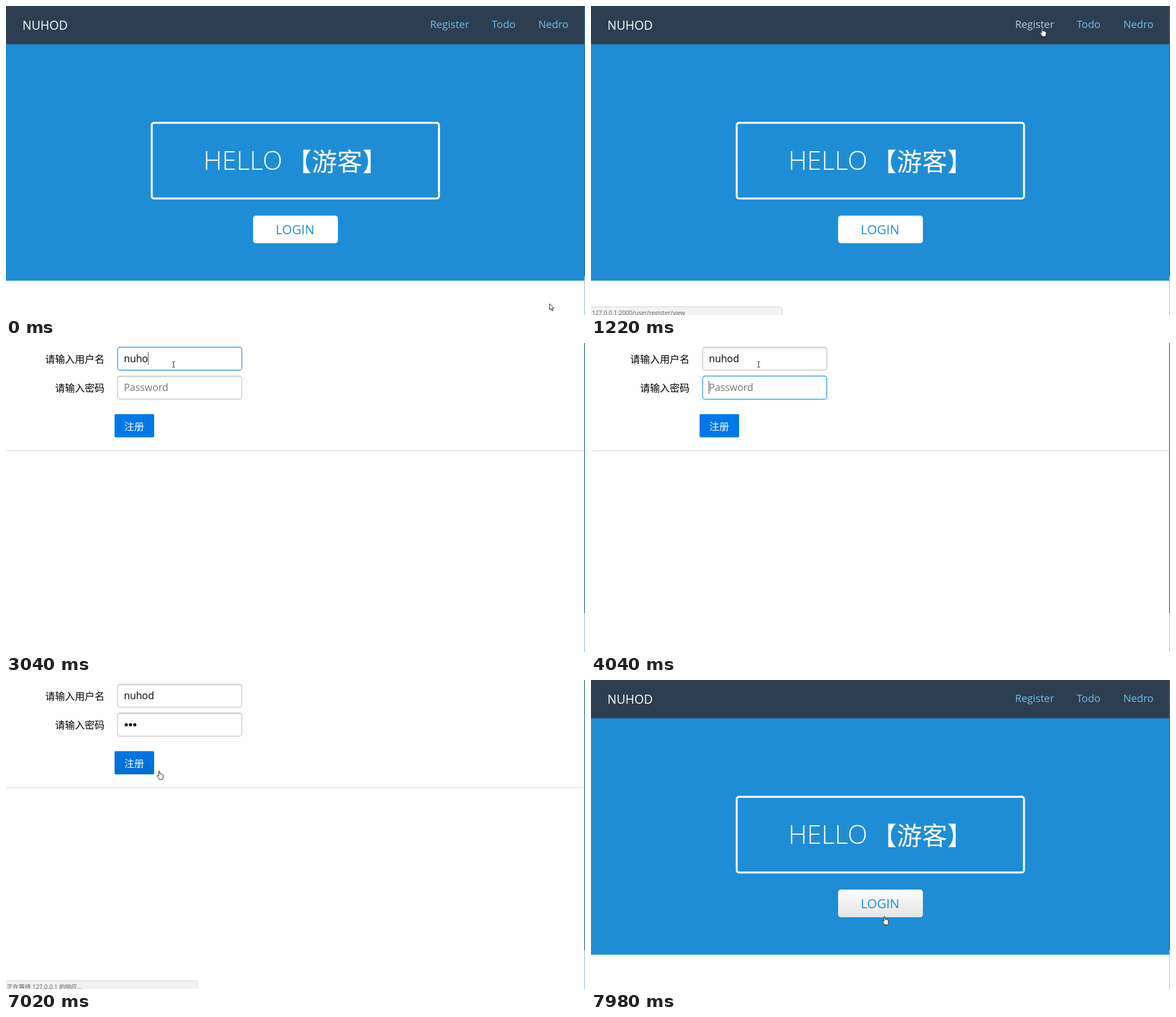
An HTML page with a canvas for the animation above (8000 ms loop, 1024 by 547 pixels).

```html
<!DOCTYPE html>
<html lang="zh">
<head>
<meta charset="utf-8">
<title>Register demo</title>
<style>
html, body { margin: 0; width: 100%; height: 100%; overflow: hidden; background: #fff; }
canvas { display: block; width: 100vw; height: 100vh; }
</style>
</head>
<body>
<canvas id="stage" width="1024" height="547"></canvas>
<script>
const ctx = document.getElementById('stage').getContext('2d');
const LOOP = 8000;
const FAMILY = '"Open Sans", "Noto Sans CJK SC", "Noto Sans CJK", sans-serif';
const USER = 'nuhod';

const LOGIN = { x: 437, y: 371, w: 150, h: 49 };
const SUBMIT = { x: 192, y: 126, w: 70, h: 41 };
const NAME_BOX = { x: 197, y: 7, w: 220.5, h: 41.5 };
const PASS_BOX = { x: 197, y: 58, w: 220.5, h: 42 };

const inside = (p, r) => p.x >= r.x && p.x <= r.x + r.w && p.y >= r.y && p.y <= r.y + r.h;
const lerp = (a, b, p) => a + (b - a) * p;
const between = (t, a, b) => t >= a && t < b;
const countPast = (t, times) => times.filter(at => t >= at).length;

// Progress in n even jumps, the first at t0 and the last at t1.
function jumps(t, t0, t1, n) {
  if (t < t0) return 0;
  return Math.min(n, Math.floor((t - t0) / (t1 - t0) * (n - 1) + 0.001) + 1) / n;
}

function move(from, to, p) {
  return { x: lerp(from[0], to[0], p), y: lerp(from[1], to[1], p) };
}

function text(str, x, y, size, color, weight = 400) {
  ctx.font = `${weight} ${size}px ${FAMILY}`;
  ctx.fillStyle = color;
  ctx.fillText(str, x, y);
}

function rect(x, y, w, h, color) {
  ctx.fillStyle = color;
  ctx.fillRect(x, y, w, h);
}

function rounded(x, y, w, h, r) {
  ctx.beginPath();
  ctx.roundRect(x, y, w, h, r);
}

function button(b, radius, color, hover, pressed) {
  rounded(b.x, b.y, b.w, b.h, radius);
  ctx.fillStyle = color;
  ctx.fill();
  if (hover) {
    const shade = ctx.createLinearGradient(0, b.y, 0, b.y + b.h);
    shade.addColorStop(0, 'rgba(0,0,0,0)');
    shade.addColorStop(0.4, 'rgba(0,0,0,.05)');
    shade.addColorStop(1, 'rgba(0,0,0,.1)');
    ctx.fillStyle = shade;
    ctx.fill();
  }
  if (pressed) {
    for (let i = 0; i < 4; i++) {
      rounded(b.x + i + 0.5, b.y + i + 0.5, b.w - 2 * i - 1, b.h - 2 * i - 1, radius);
      ctx.strokeStyle = `rgba(0,0,0,${0.24 - i * 0.06})`;
      ctx.lineWidth = 1;
      ctx.stroke();
    }
  }
}

function field(b, focused) {
  rounded(b.x, b.y, b.w, b.h, 4);
  ctx.fillStyle = '#fff';
  ctx.fill();
  if (!focused) {
    rect(b.x + 2, b.y + 1, b.w - 4, 1.5, '#e2e2e2');
    rect(b.x + 2, b.y + 2.5, b.w - 4, 1, '#f4f4f4');
  }
  rounded(b.x + 0.5, b.y + 0.5, b.w - 1, b.h - 1, 4);
  ctx.strokeStyle = focused ? '#2a9be0' : '#c6c6c6';
  ctx.lineWidth = 1.4;
  ctx.stroke();
}

const caret = (x, y) => rect(Math.floor(x), y, 1, 23, '#444');

const shapes = {
  arrow: new Path2D('M0 0V11L2.6 8.7L4.4 12.7L6 12L4.3 8.2H7.8Z'),
  hand: new Path2D('M-1 1.2Q0 -.2 1 1.2V5.6Q2.2 5 3.2 6.2Q4.4 5.6 5.4 6.8Q7 6.4 7 8V11.5' +
    'Q7 13.5 5.8 15.5H.2Q-.8 13.5 -3.6 9.8Q-4 8 -2.4 8.4L-1 9.6Z'),
  beam: new Path2D('M-2.5 -5H-.7L0 -4.4L.7 -5H2.5M0 -4.4V4.4M-2.5 5H-.7L0 4.4L.7 5H2.5')
};

function pointer(p) {
  ctx.save();
  ctx.translate(p.x, p.y);
  ctx.lineJoin = 'round';
  ctx.lineWidth = 1;
  ctx.strokeStyle = '#1c1c1c';
  if (p.kind !== 'beam') {
    ctx.fillStyle = '#fff';
    ctx.fill(shapes[p.kind]);
  }
  ctx.stroke(shapes[p.kind]);
  ctx.restore();
}

function pointerAt(t) {
  let p;
  if (t < 920) {
    const k = jumps(t, 70, 840, 11);
    p = move([961.5, 527], [827, 57.5], k * k * (3 - 2 * k));
  } else if (t < 1870) {
    p = move([827, 57.5], [798, 38.5], jumps(t, 920, 1220, 5));
    if (t >= 995) p.kind = 'hand';
  } else if (t < 6060) {
    p = move([296.5, 38], [231, 159], jumps(t, 5610, 5840, 4));
    if (inside(p, NAME_BOX) || inside(p, PASS_BOX)) p.kind = 'beam';
    if (inside(p, SUBMIT)) p.kind = 'hand';
  } else if (t < 6930) {
    p = move([231, 159], [228, 158], jumps(t, 6060, 6240, 3));
    p.kind = 'hand';
  } else if (t < 7200) {
    p = move([228, 158], [271, 160.5], jumps(t, 6930, 7020, 2));
    if (t < 7090) p.kind = 'hand';
  } else {
    p = move([542, 157.5], [519, 418], jumps(t, 7430, 7980, 8) ** 1.6);
    if (inside(p, LOGIN)) p.kind = 'hand';
  }
  p.kind = p.kind || 'arrow';
  return p;
}

function homePage(t, p) {
  rect(0, 67, 1024, 419.3, '#1f8dd6');
  rect(0, 0, 1024, 67.5, '#2d3e50');
  rect(0, 67.5, 1024, 1, 'rgba(0,0,0,.15)');
  text(USER.toUpperCase(), 29, 42.2, 21.5, '#fff');
  const onRegister = between(t, 995, 1770);
  text('Register', 750, 38.5, 18.3, onRegister ? '#aecfe5' : '#6fbef3');
  text('Todo', 859, 38.5, 18.3, '#6fbef3');
  text('Nedro', 941.5, 38.5, 18.3, '#6fbef3');

  rounded(257.7, 206.7, 508, 134, 4);
  ctx.strokeStyle = '#fff';
  ctx.lineWidth = 3.5;
  ctx.stroke();
  text('HELLO', 349, 290, 46, '#fff', 300);
  text('【游客】', 496, 291.5, 44.7, '#fff', 300);

  button(LOGIN, 5, '#fff', inside(p, LOGIN));
  text('LOGIN', 477, 404, 22.5, '#1f8dd6');
}

function formPage(t, p) {
  const onPass = between(t, 4040, 6380);
  const onName = between(t, 1870, 4040);
  const name = USER.slice(0, countPast(t, [1870, 1950, 2650, 3040, 3200]));
  const dots = countPast(t, [4830, 5080, 5230]);

  text('请输入用户名', 69.3, 34.6, 17.5, '#000');
  text('请输入密码', 86.8, 85.6, 17.5, '#000');
  field(NAME_BOX, onName);
  field(PASS_BOX, onPass);

  text(name || 'Username', 208.4, 34.2, 17.5, name ? '#000' : '#757575');
  if (onName && !between(t, 2480, 2650) && t < 3730) {
    caret(208.4 + ctx.measureText(name).width, 16);
  }

  if (!dots) text('Password', 208.4, 85.2, 17.5, '#757575');
  ctx.fillStyle = '#000';
  for (let i = 0; i < dots; i++) {
    ctx.beginPath();
    ctx.arc(212.7 + i * 7.5, 79.3, 2.8, 0, 7);
    ctx.fill();
  }
  if (onPass && !between(t, 4590, 4830) && !between(t, 5760, 6240)) {
    caret(208.4 + dots * 7.6, 67);
  }

  const hover = t >= 6930 || inside(p, SUBMIT);
  button(SUBMIT, 2, '#0078e7', hover, between(t, 6380, 6540));
  text('注册', 209.3, 153.8, 17.5, '#fff');
  rect(0, 189.8, 1022, 1.3, '#dedede');
}

function statusBar(str) {
  rounded(-4, 532.5, 342.5, 20, 3);
  ctx.fillStyle = '#f2f2f2';
  ctx.fill();
  ctx.strokeStyle = '#d4d4d4';
  ctx.lineWidth = 1;
  ctx.stroke();
  text(str, 1.5, 546.5, 10.6, '#5c5c5c');
}

function draw(t) {
  const p = pointerAt(t);
  rect(0, 0, 1024, 547, '#fefefe');
  if (between(t, 1770, 7090)) formPage(t, p);
  else homePage(t, p);

  if (between(t, 1145, 1870)) statusBar('127.0.0.1:2000/user/register/view');
  if (between(t, 6780, 7200)) statusBar('正在等待 127.0.0.1 的响应...');

  rect(1022.6, 0, 1.4, 478, '#2a6c9c');
  rect(1022.6, 478, 1.4, 69, '#a4cbe4');
  pointer(p);
}

function frame(now) {
  draw(now % LOOP);
  requestAnimationFrame(frame);
}
draw(0);
requestAnimationFrame(frame);
</script>
</body>
</html>
```
